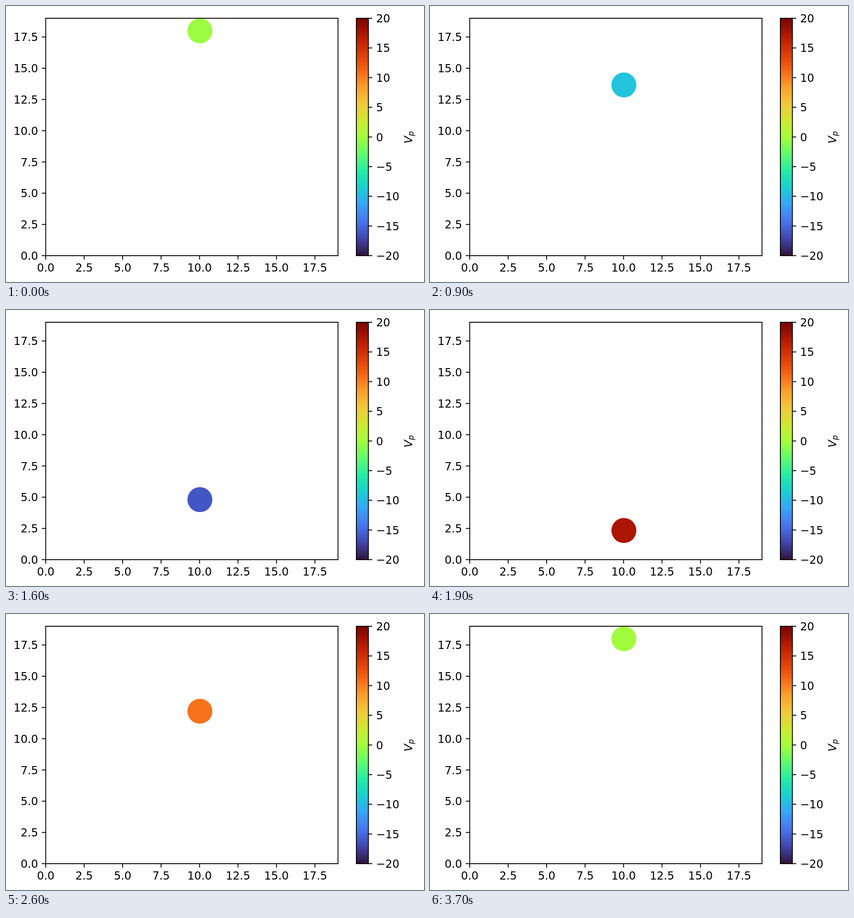
These frames come from a looping animation (921x608 px, 3800 ms). An HTML page:

```html
<!DOCTYPE html>
<html lang="en">
<head>
<meta charset="utf-8">
<title>Bouncing ball</title>
<style>
  html, body { margin: 0; width: 100%; height: 100%; overflow: hidden; background: #fff; }
  svg { display: block; width: 921px; height: 608px; }
  text { font: 24.3px "DejaVu Sans", sans-serif; }
  .line { fill: none; stroke: #000; stroke-width: 1.9; }
</style>
</head>
<body>
<svg viewBox="0 0 921 608">
  <defs>
    <linearGradient id="turbo" x1="0" y1="1" x2="0" y2="0"></linearGradient>
    <clipPath id="plot"><rect x="87.5" y="27" width="644" height="523"/></clipPath>
  </defs>
  <g clip-path="url(#plot)"><circle id="ball" cx="427.2" r="27.5"/></g>
  <rect x="772" y="27" width="26.5" height="523" fill="url(#turbo)"/>
  <g id="axes">
    <rect class="line" x="87.5" y="27" width="644" height="523"/>
    <rect class="line" x="772" y="27" width="26.5" height="523"/>
  </g>
  <text transform="translate(894.5 303) rotate(-90)" font-style="italic" style="font-style:italic">V<tspan dy="3" style="font-size:17px">p</tspan></text>
</svg>
<script>
const LEFT = 87.5, BOTTOM = 550, WIDTH = 644, HEIGHT = 523, SPAN = 19;
const LOOP = 3800, STEP = 100;
const G = 9.8, TOP = 18, FALL = 1.8645, BOUNCE = 1.8235;

const colors = ("30123b 4145ab 4675ed 39a2fc 1bcfd4 24eca6 61fc6c a4fc3b " +
  "d1e834 f3c63a fe9b2d f36315 d93806 b11901 7a0402").split(" ")
  .map(hex => [0, 2, 4].map(i => parseInt(hex.slice(i, i + 2), 16)));
const last = colors.length - 1;

const byId = id => document.getElementById(id);
const ball = byId("ball");
const px = x => LEFT + x / SPAN * WIDTH;
const py = y => BOTTOM - y / SPAN * HEIGHT;

function add(parent, tag, attrs, text = "") {
  const el = document.createElementNS("http://www.w3.org/2000/svg", tag);
  for (const key in attrs) el.setAttribute(key, attrs[key]);
  el.textContent = text;
  parent.append(el);
}

function turbo(x) {
  const pos = Math.min(Math.max(x, 0), 1) * last;
  const i = Math.min(Math.floor(pos), last - 1);
  const mix = colors[i].map((c, k) => Math.round(c + (colors[i + 1][k] - c) * (pos - i)));
  return `rgb(${mix})`;
}

function tick(x, y, dx, dy, label, tx, ty, anchor) {
  add(byId("axes"), "path", { class: "line", d: `M${x} ${y}l${dx} ${dy}` });
  add(byId("axes"), "text", { x: tx, y: ty, "text-anchor": anchor }, label);
}

for (let i = 0; i <= last; i++)
  add(byId("turbo"), "stop", { offset: i / last, "stop-color": turbo(i / last) });

for (let v = 0; v < SPAN; v += 2.5) {
  const x = px(v), y = py(v), label = v.toFixed(1);
  tick(x, BOTTOM, 0, 8.5, label, x, 585, "middle");
  tick(LEFT, y, -8.5, 0, label, 70.8, y + 9, "end");
}

for (let v = -20; v <= 20; v += 5) {
  const y = BOTTOM - (v + 20) / 40 * HEIGHT;
  tick(798.5, y, 8.5, 0, String(v).replace("-", "\u2212"), 815.5, y + 9, "start");
}

function draw(now) {
  const t = Math.floor(now % LOOP / STEP) * STEP / 1000;
  // time away from the apex, mirrored at the elastic bounce
  const tau = FALL - Math.abs(t - BOUNCE);
  const velocity = (t < BOUNCE ? -G : G) * tau;
  ball.setAttribute("cy", py(TOP - G / 2 * tau * tau));
  ball.setAttribute("fill", turbo((velocity + 20) / 40));
}

const start = performance.now();
function frame() {
  draw(performance.now() - start);
  requestAnimationFrame(frame);
}
frame();
</script>
</body>
</html>
```
